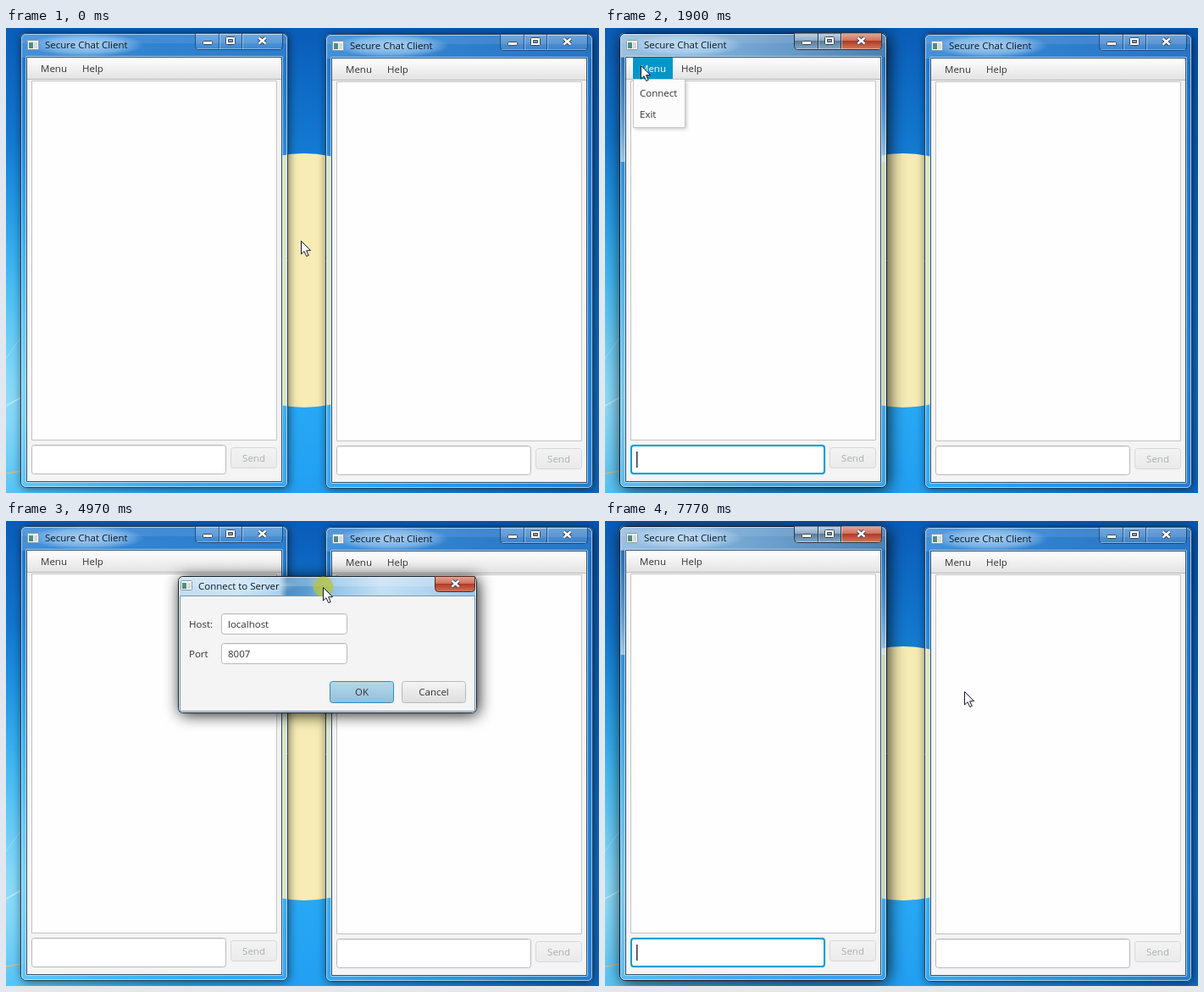
An HTML page with a canvas for the animation above (8000 ms loop, 700 by 549 pixels).

```html
<!DOCTYPE html>
<html lang="en">
<head>
<meta charset="utf-8">
<title>Secure Chat Client</title>
<style>
html, body { margin: 0; width: 100%; height: 100%; overflow: hidden; background: #1583da; }
canvas { display: block; width: 700px; height: 549px; }
</style>
</head>
<body>
<canvas id="stage" width="700" height="549"></canvas>
<script>
const ctx = document.getElementById('stage').getContext('2d');
const LOOP = 8000;
const FONT = '11.5px "Open Sans", "Noto Sans", sans-serif';

// Each step changes part of the scene state at its time (ms).
const steps = [
  [0, { pos: [348, 251], cursor: 'arrow' }],
  [900, { pos: [230, 158] }],
  [1100, { pos: [144, 100] }],
  [1300, { pos: [75, 63] }],
  [1500, { pos: [43, 46], menu: true }],
  [1700, { pos: [42, 44] }],
  [1900, { active: true, focus: true, caret: true, popup: true }],
  [2310, { pos: [46, 47], caret: false }],
  [2520, { pos: [54, 61] }],
  [2710, { pos: [60, 74], item: true }],
  [2920, { popup: false, caret: true }],
  [3150, { active: false }],
  [3350, { menu: false, focus: false, caret: false }],
  [3530, { cursor: '' }],
  [4970, { dialog: 1, dx: 0, pos: [374, 78], cursor: 'arrow', click: true }],
  [5160, { dx: 2, pos: [376, 78] }],
  [5760, { click: false }],
  [5960, { pos: [357, 111], cursor: 'beam' }],
  [6160, { pos: [334, 170] }],
  [6360, { pos: [447, 197], cursor: 'arrow' }],
  [6560, { pos: [424, 201], hover: true }],
  [6780, { dialog: 0.3, active: true }],
  [7000, { dialog: 0, focus: true, caret: true }],
  [7170, { caret: false }],
  [7770, { caret: true }]
];

function gradient(x0, y0, x1, y1, ...stops) {
  const g = ctx.createLinearGradient(x0, y0, x1, y1);
  stops.forEach(([at, color]) => g.addColorStop(at, color));
  return g;
}

function vertical(y0, y1, ...colors) {
  return gradient(0, y0, 0, y1, ...colors.map((c, i) => [i / (colors.length - 1), c]));
}

function rect(x, y, w, h, fill) {
  ctx.fillStyle = fill;
  ctx.fillRect(x, y, w, h);
}

// Filled box with a one pixel edge on the pixel grid.
function box(x, y, w, h, r, fill, edge, width = 1) {
  const d = width / 2;
  ctx.beginPath();
  ctx.roundRect(x + d, y + d, w - width, h - width, r);
  if (fill) { ctx.fillStyle = fill; ctx.fill(); }
  if (edge) { ctx.strokeStyle = edge; ctx.lineWidth = width; ctx.stroke(); }
}

function text(str, x, y, color = '#333', align = 'left') {
  ctx.font = FONT;
  ctx.textAlign = align;
  ctx.fillStyle = color;
  ctx.fillText(str, x, y);
}

function line(points, color, width) {
  ctx.beginPath();
  points.forEach(([x, y], i) => i ? ctx.lineTo(x, y) : ctx.moveTo(x, y));
  ctx.strokeStyle = color;
  ctx.lineWidth = width;
  ctx.stroke();
}

// Soft shadow painted only outside the box.
function shadow(x, y, w, h, r, blur, alpha, drop) {
  ctx.save();
  ctx.beginPath();
  ctx.rect(-700, -549, 2100, 1647);
  ctx.roundRect(x, y, w, h, r);
  ctx.clip('evenodd');
  ctx.shadowColor = `rgba(0,0,0,${alpha})`;
  ctx.shadowBlur = blur;
  ctx.shadowOffsetX = drop;
  ctx.shadowOffsetY = drop;
  box(x, y, w, h, r, '#000');
  ctx.restore();
}

function glow(x, y, rx, ry, alpha) {
  ctx.save();
  ctx.translate(x, y);
  ctx.scale(rx, ry);
  const g = ctx.createRadialGradient(0, 0, 0.2, 0, 0, 1);
  g.addColorStop(0, `rgba(215,238,255,${alpha})`);
  g.addColorStop(0.6, `rgba(205,232,255,${alpha * 0.65})`);
  g.addColorStop(1, 'rgba(200,230,255,0)');
  rect(-1, -1, 2, 2, g);
  ctx.restore();
}

function wallpaper() {
  rect(0, 0, 700, 549, vertical(0, 549, '#0a5cb8', '#1279d2', '#1b98ea', '#29abf7', '#229ff2'));
  const g = ctx.createRadialGradient(-30, 440, 20, -30, 440, 320);
  g.addColorStop(0, 'rgba(160,228,250,.9)');
  g.addColorStop(0.4, 'rgba(95,206,248,.65)');
  g.addColorStop(1, 'rgba(40,170,240,0)');
  rect(0, 100, 330, 449, g);
  rect(400, 0, 300, 549, gradient(400, 0, 700, 0, [0, 'rgba(6,80,170,0)'], [1, 'rgba(6,80,170,.7)']));
  line([[0, 446], [18, 436]], 'rgba(225,246,255,.6)', 1.5);
  line([[0, 390], [18, 365]], 'rgba(225,246,255,.3)', 1);
  line([[0, 526], [18, 523]], '#d6bd82', 1.5);
  ctx.beginPath();
  ctx.arc(352, 298, 150, 0, Math.PI * 2);
  ctx.fillStyle = '#f7ecb4';
  ctx.fill();
}

function appIcon(x, y) {
  box(x, y, 14, 12, 1, '#f6f8f8', '#8b9aa3');
  rect(x + 2, y + 3, 5, 7, vertical(y + 3, y + 10, '#4f8fa0', '#4d8a68'));
  rect(x + 8, y + 3, 4, 7, '#d3dade');
}

function closeGlyph(x, y) {
  for (const [color, width] of [['#3b4656', 4.4], ['#fff', 2.4]]) {
    line([[x - 4, y - 3.5], [x + 4, y + 3.5]], color, width);
    line([[x + 4, y - 3.5], [x - 4, y + 3.5]], color, width);
  }
}

function closeFill(y, h) {
  return gradient(0, y, 0, y + h, [0, '#e3aa9d'], [0.45, '#cf7360'], [0.5, '#b03a24'], [1, '#d4795c']);
}

function captionButtons(active) {
  const edge = active ? '#25384d' : 'rgba(20,55,100,.75)';
  const glass = active
    ? gradient(0, 6, 0, 25, [0, '#c3d6e6'], [0.45, '#90abc4'], [0.5, '#587c9c'], [1, '#86a9c6'])
    : vertical(6, 25, 'rgba(255,255,255,.28)', 'rgba(255,255,255,.08)');
  ctx.beginPath();
  ctx.roundRect(223.5, 6.5, 103, 19, [0, 0, 4, 4]);
  ctx.fillStyle = glass;
  ctx.fill();
  if (active) box(279, 6, 48, 20, [0, 0, 4, 4], closeFill(6, 19));
  ctx.beginPath();
  ctx.roundRect(223.5, 5.5, 103, 20, [0, 0, 4, 4]);
  ctx.strokeStyle = edge;
  ctx.lineWidth = 1;
  ctx.stroke();
  for (const x of [251.5, 278.5]) {
    line([[x, 6], [x, 25]], edge, 1);
    line([[x + 1, 7], [x + 1, 25]], 'rgba(255,255,255,.4)', 1);
  }
  line([[225, 24.5], [325, 24.5]], 'rgba(255,255,255,.35)', 1);
  box(232, 15, 12, 5, 1, '#fff', '#3b4656');
  box(259, 10, 12, 10, 1, '#fff', '#3b4656');
  box(262, 13, 6, 4, 0, '#7d9dbd', '#3b4656');
  closeGlyph(302.5, 15);
}

function field(x, y, w, h, focused) {
  if (focused) {
    box(x - 1, y - 1, w + 2, h + 2, 4, '#c9ebf6');
    box(x, y, w, h, 3, '#fff', '#0b9ccf', 2);
  } else {
    box(x, y, w, h, 3, '#fff', '#b9b9b9');
    rect(x + 2, y + 1, w - 4, 1, '#ececec');
  }
}

function glassFrame(active) {
  ctx.save();
  ctx.beginPath();
  ctx.roundRect(17, 6, 316, 537, 6);
  ctx.clip();
  rect(17, 6, 316, 537, active ? 'rgba(110,165,205,.3)' : 'rgba(125,200,250,.2)');
  if (active) {
    rect(17, 6, 316, 29, gradient(17, 0, 332, 0, [0, 'rgba(195,218,236,.75)'], [0.45, 'rgba(150,188,218,.7)'], [1, 'rgba(85,130,172,.75)']));
    const sheen = vertical(34, 158, 'rgba(40,90,140,.25)', 'rgba(215,232,245,.65)');
    rect(17, 34, 8, 124, sheen);
    rect(325, 34, 8, 124, sheen);
  } else {
    rect(17, 6, 316, 29, gradient(17, 0, 332, 0, [0, 'rgba(130,195,245,.35)'], [0.5, 'rgba(100,175,235,.22)'], [1, 'rgba(90,165,230,.15)']));
  }
  rect(17, 6, 316, 12, 'rgba(255,255,255,.09)');
  ctx.restore();
  box(17, 6, 316, 537, 6, null, active ? '#111b26' : '#20415f');
  box(18, 7, 314, 535, 5, null, 'rgba(220,242,255,.65)');
  box(23, 33, 304, 504, 1, null, 'rgba(205,236,255,.7)');
}

function chatWindow(dx, dy, s) {
  ctx.save();
  ctx.translate(dx, dy);
  shadow(17, 6, 316, 537, 6, s.active ? 20 : 11, s.active ? 0.85 : 0.6, s.active ? 2 : 1);
  glassFrame(s.active);
  captionButtons(s.active);
  glow(95, 20, 68, 14, 0.62);
  appIcon(25, 14);
  text('Secure Chat Client', 46, 24, '#101820');

  box(24, 34, 302, 502, 0, '#f4f4f4', '#34506a');
  rect(25, 35, 300, 25, vertical(35, 60, '#fefefe', '#e3e3e3'));
  rect(25, 60, 300, 1, '#b8b8b8');
  if (s.menu) rect(33, 35, 47, 25, '#0096c9');
  text('Menu', 41, 52, s.menu ? '#fff' : '#333');
  text('Help', 90, 52);

  box(30, 62, 290, 425, 0, '#fefefe', '#c4c4c4');
  field(30, 492, 230, 35, s.focus);
  if (s.caret) rect(37, 500, 1.5, 19, '#333');
  box(265, 495, 55, 25, 3, vertical(495, 520, '#f3f3f3', '#eaeaea'), '#d8d8d8');
  text('Send', 292.5, 512, '#a9b0ab', 'center');
  ctx.restore();
}

function popup(s) {
  shadow(33, 61, 62, 57, 0, 4, 0.25, 1);
  box(33, 60, 62, 58, 0, '#fcfcfc', '#c8c8c8');
  if (s.item) rect(34, 65, 60, 25, '#0096c9');
  text('Connect', 41, 81, s.item ? '#fff' : '#333');
  text('Exit', 41, 106);
}

function dialogButton(label, x, fill, edge) {
  box(x, 189, 76, 26, 3, fill, edge);
  text(label, x + 38, 206, '#333', 'center');
}

function dialog(s) {
  ctx.save();
  ctx.translate(s.dx, 0);
  ctx.globalAlpha = s.dialog;
  if (s.dialog === 1) shadow(203, 65, 353, 162, 5, 18, 0.9, 2);
  const glass = gradient(203, 0, 556, 0,
    [0, '#c3ddf0'], [0.2, '#cbe2f5'], [0.34, '#acd0ec'], [0.365, '#4f8dc0'],
    [0.43, '#5b9bd0'], [0.52, '#93c5ea'], [0.68, '#c4e0f5'], [1, '#9cc8eb']);
  box(203, 65, 353, 162, 5, glass, '#17222d');
  rect(205, 67, 349, 10, 'rgba(255,255,255,.2)');
  box(204, 66, 351, 160, 4, null, 'rgba(235,248,255,.75)');
  glow(275, 77, 68, 11, 0.55);
  appIcon(206, 70);
  text('Connect to Server', 227, 81, '#101820');
  box(506, 65, 48, 19, [0, 0, 4, 4], closeFill(65, 19), '#5a2720');
  closeGlyph(530.5, 74);

  box(205, 88, 349, 137, 0, '#f4f4f4', '#7795aa');
  text('Host:', 216, 126);
  text('Port', 216, 161);
  field(254, 109, 149, 25);
  field(254, 144, 149, 25);
  text('localhost', 262, 126);
  text('8007', 262, 161);
  const blue = s.hover ? vertical(189, 214, '#c3e5f4', '#a9d4e8') : vertical(189, 214, '#b4d9ea', '#94c0d8');
  dialogButton('OK', 382, blue, '#2d8dba');
  dialogButton('Cancel', 467, vertical(189, 214, '#f5f5f5', '#dedede'), '#b9b9b9');
  ctx.restore();
}

function cursor(kind, [x, y]) {
  ctx.save();
  ctx.translate(x, y);
  if (kind === 'beam') {
    rect(0, -7, 1, 15, '#000');
    for (const end of [-8, 7]) {
      rect(-3, end, 3, 1, '#000');
      rect(1, end, 3, 1, '#000');
    }
  } else {
    ctx.beginPath();
    [[0.5, 0.5], [0.5, 16], [4, 12.7], [6.7, 18.5], [9.2, 17.4], [6.6, 11.8], [11.5, 11.6]]
      .forEach(([px, py]) => ctx.lineTo(px, py));
    ctx.closePath();
    ctx.fillStyle = '#fff';
    ctx.fill();
    ctx.strokeStyle = '#101828';
    ctx.lineWidth = 1;
    ctx.stroke();
  }
  ctx.restore();
}

function draw(s) {
  ctx.clearRect(0, 0, 700, 549);
  wallpaper();
  chatWindow(360, 1, {});
  chatWindow(0, 0, s);
  if (s.popup) popup(s);
  if (s.dialog) dialog(s);
  if (s.click) {
    ctx.beginPath();
    ctx.arc(s.pos[0] + 0.5, 77.5, 12, 0, Math.PI * 2);
    ctx.fillStyle = 'rgba(190,196,50,.72)';
    ctx.fill();
  }
  if (s.cursor) cursor(s.cursor, s.pos);
}

let shown = -1;
const start = performance.now();

function tick(now) {
  const t = Math.max(0, now - start) % LOOP;
  const past = steps.filter(([at]) => at <= t);
  if (past.length !== shown) {
    shown = past.length;
    draw(Object.assign({}, ...past.map(([, change]) => change)));
  }
  requestAnimationFrame(tick);
}
tick(start);
</script>
</body>
</html>
```
